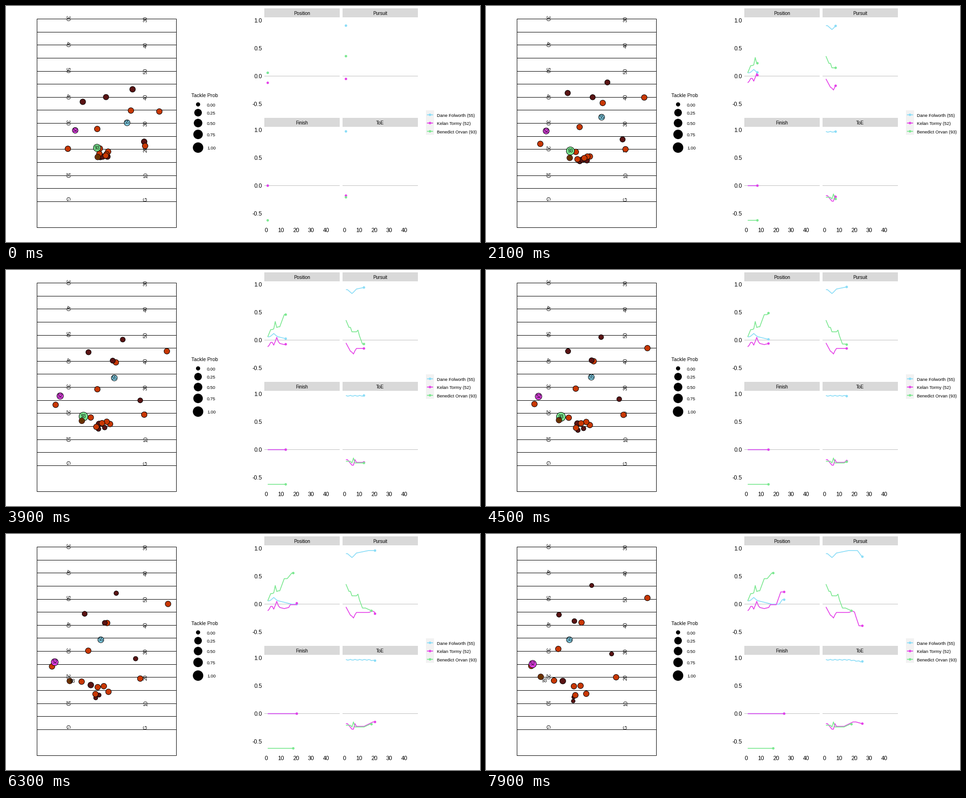
A matplotlib script that plays this animation: 1000 by 500 pixels, repeating every 8 s.

```python
import numpy as np
import matplotlib.pyplot as plt
from matplotlib.animation import FuncAnimation
from matplotlib.patches import Circle, Rectangle

W, H, DPI = 1000, 500, 100
FRAMES, STEP_MS = 80, 100
PT = 72 / DPI
BLUE, PINK, GREEN = "#8BDDF7", "#E542E9", "#7CE891"
MAROON, ORANGE, BROWN = "#5A1414", "#C83803", "#663300"

plt.rcParams["font.family"] = "Liberation Sans"
plt.rcParams["path.snap"] = False
fig = plt.figure(figsize=(W / DPI, H / DPI), dpi=DPI, facecolor="white")
ax = fig.add_axes([0, 0, 1, 1])
ax.set_xlim(0, W)
ax.set_ylim(H, 0)
ax.axis("off")


def label(x, y, s, px, ha="left"):
    """Text whose capitals are centred on y."""
    ax.text(x, y + 0.355 * px, s, fontsize=px * PT, ha=ha, va="baseline")


def line(xs, ys, color="black", px=1, z=1):
    return ax.plot(xs, ys, color=color, lw=px * PT, zorder=z,
                   solid_capstyle="butt", solid_joinstyle="round")[0]


def box(x, y, w, h, face, edge="none"):
    ax.add_patch(Rectangle((x, y), w, h, facecolor=face, edgecolor=edge, lw=PT))


def disc(x, y, r, face, edge="none", z=3):
    return ax.add_patch(Circle((x, y), r, facecolor=face, edgecolor=edge,
                               lw=PT, zorder=z))


# ---- field ----
YARD = 27.64
box(65.5, 27.5, 294, 442, "none", "black")
for i in range(1, 15):
    y = round(27 + i * YARD) + 0.5
    line([65, 360], [y, y])
for i, s in enumerate(["30", "40", "50", "40", "30", "20", "10", "G"]):
    y = 27 + 2 * i * YARD - (5 if s == "G" else 0)
    for x, dy, turn in ((129.5, -1, 270), (295, 0.5, 90)):
        ax.text(x, y + dy, s, fontsize=11 * PT, rotation=turn, ha="center",
                va="center")

# ---- legends ----
label(391, 189, "Tackle Prob", 10.6)
for p, y, r in zip((0, 0.25, 0.5, 0.75, 1), (208.5, 226, 248, 272, 300),
                   (4.4, 8, 9, 10, 11)):
    disc(405.2, y, r, "black")
    label(424, y + 1, f"{p:.2f}", 9.4)

box(886, 221, 17, 52, "#F2F2F2")
NAMES = ["Dane Folworth (55)", "Kelan Tormy (52)", "Benedict Orvan (93)"]
for i, (s, c) in enumerate(zip(NAMES, (BLUE, PINK, GREEN))):
    y = 230.5 + 17.5 * i
    line([888, 901], [y, y], c, 1.8)
    disc(894.5, y, 2.6, c)
    label(909, y + 1, s, 9.4)

# ---- chart panels ----
UNIT_X, UNIT_Y = 3.17, 117.6
PANELS = [("Position", 545, 5), ("Pursuit", 710, 5),
          ("Finish", 545, 237), ("ToE", 710, 237)]
for name, x, y in PANELS:
    box(x, y, 159, 19, "#D9D9D9")
    label(x + 79.5, y + 10.5, name, 9.8, "center")
    line([x, x + 159], [y + 143.5] * 2, "#BEBEBE")
    if x < 600:
        for v in (1.0, 0.5, 0.0, -0.5):
            label(540, y + 143.7 - v * UNIT_Y, f"{v:.1f}", 12, "right")
    if y > 100:
        for v in range(0, 50, 10):
            label(x + 3.5 + v * UNIT_X, 475, str(v), 12, "center")

T = np.arange(1, 27)


def ramp(a, b):
    """Rise from 0 to 1 between times a and b."""
    return np.clip((T - a) / (b - a), 0, 1)


def peak(c, w):
    """Triangle of height 1 around time c."""
    return np.clip(1 - abs(T - c) / w, 0, None)


position = [
    0.06 + 0.06 * peak(5, 2.5) - 0.06 * ramp(8, 17) + 0.08 * ramp(22, 24),
    -0.12 + 0.06 * ramp(1, 3) + 0.03 * peak(3.5, 1.5) - 0.03 * peak(5, 1)
    + 0.11 * peak(7, 1.5) - 0.02 * peak(12, 3) + 0.05 * ramp(15, 16)
    + 0.23 * ramp(20, 23),
    0.06 + 0.13 * ramp(1, 3) + 0.05 * ramp(4, 8) + 0.12 * peak(6, 1)
    + 0.22 * ramp(9, 12) + 0.1 * ramp(14, 17),
]
pursuit = [
    0.91 - 0.07 * peak(5, 3) + 0.055 * ramp(6, 16) - 0.11 * ramp(22, 25),
    -0.05 - 0.15 * ramp(1, 4) - 0.05 * peak(6, 1.5) + 0.05 * ramp(6, 8)
    + 0.03 * peak(18.5, 2) - 0.24 * ramp(20, 23),
    0.36 - 0.13 * ramp(1, 3) - 0.08 * ramp(4, 5) + 0.03 * peak(9, 1)
    - 0.22 * ramp(9, 12) - 0.05 * ramp(14, 18),
]
finish = [0 * T, 0 * T, 0 * T - 0.625]
toe = [
    0.97 - 0.03 * ramp(16, 24) + 0.008 * np.sin(2 * T),
    -0.18 - 0.1 * ramp(2, 5) + 0.05 * ramp(6, 7) + 0.05 * peak(7, 1)
    + 0.08 * ramp(13, 19) - 0.03 * ramp(21, 25),
    -0.21 - 0.03 * ramp(4, 5) + 0.09 * peak(6, 1) + 0.05 * ramp(13, 17),
]

curves = []
for (_, px, py), group in zip(PANELS, (position, pursuit, finish, toe)):
    for v, c, z, last in zip(group, (BLUE, PINK, GREEN), (4, 5, 6), (26, 26, 18)):
        curves.append((px + 4, py + 143.6 - v * UNIT_Y, last,
                       line([], [], c, 1.7, z), disc(0, 0, 2.6, c, z=z + 0.5)))

# ---- players: start, middle and end of each run ----
movers, tags = [], []


def add(run, face, r0=6, r1=6, z=4, edge="black"):
    a, m, b = np.array(run, float)

    def move(u):
        return a * (1 - u) + b * u + (m - (a + b) / 2) * 4 * u * (1 - u)

    movers.append((move, r0, r1, disc(0, 0, r0, face, edge, z)))
    return move


defence = [
    ([(162, 203), (174, 174), (154, 171)], 5.2),
    ([(267, 176.5), (246, 147), (223, 109)], 4.5),
    ([(291.5, 287.5), (283, 276), (265, 254)], 4.5),
    ([(199, 320), (195, 337), (184, 354)], 4),
    ([(214, 319), (208, 334), (185, 345.5)], 4),
    ([(204, 319), (196, 326), (162, 311.5)], 6.2),
]
safety = [(211, 193), (225, 192), (186.5, 184.5)]
offence = [
    [(263.5, 221.5), (231.5, 195.5), (201.5, 187.5)],
    [(323.5, 223.5), (339.5, 171.5), (340.5, 135.5)],
    [(192.5, 260.5), (192.5, 252.5), (152.5, 243.5)],
    [(130.5, 302.5), (104.5, 285.5), (95.5, 279.5)],
    [(293.5, 296.5), (291.5, 306.5), (274.5, 303.5)],
    [(198, 302), (178.5, 312.5), (143.5, 310.5)],
    [(215.5, 308.5), (219.5, 326.5), (211.5, 338.5)],
    [(212, 314), (212.5, 321.5), (199.5, 321.5)],
    [(197, 313), (190.5, 332.5), (188.5, 341.5)],
    [(210.5, 317), (202.5, 324.5), (185.5, 322.5)],
]
tacklers = [
    ("55", BLUE, [(255.5, 247.5), (228, 228.5), (176, 224)], 6.3, 6.3),
    ("52", PINK, [(146, 263.5), (114, 267), (98.5, 275.5)], 6, 7.8),
    ("93", GREEN, [(192, 300.5), (163, 310.5), (123, 310.5)], 7.7, 11),
]
carrier = [(193.5, 320), (159.5, 319.5), (115.5, 302.5)]

for run, r in defence:
    add(run, MAROON, 6, r, 3)
for run in offence:
    add(run, ORANGE)
add(safety, MAROON, 5.8, 5.2, 5)
for s, c, run, r0, r1 in tacklers:
    tags.append((add(run, c, r0, r1, 6),
                 ax.text(0, 0, s, fontsize=10 * PT, ha="center", va="center",
                         zorder=9)))
lost = movers[-1][-1]
add(carrier, ORANGE, z=7)
add(carrier, BROWN, 5, 5, 8, "none")


def draw(f):
    now = 1 + 0.307 * f
    u = f / (FRAMES - 1)
    for x0, y, last, ln, dot in curves:
        end = min(now, last)
        ts = np.append(T[T < end], end)
        xs, ys = x0 + UNIT_X * ts, np.interp(ts, T, y)
        ln.set_data(xs, ys)
        dot.center = xs[-1], ys[-1]
    for move, r0, r1, patch in movers:
        patch.center = move(u)
        patch.set_radius(r0 + (r1 - r0) * u)
    for move, tag in tags:
        tag.set_position(move(u))
    lost.set_visible(now <= 18)
    return []


anim = FuncAnimation(fig, draw, frames=FRAMES, interval=STEP_MS,
                     init_func=lambda: draw(0), repeat=True, repeat_delay=0)
plt.show()
```
